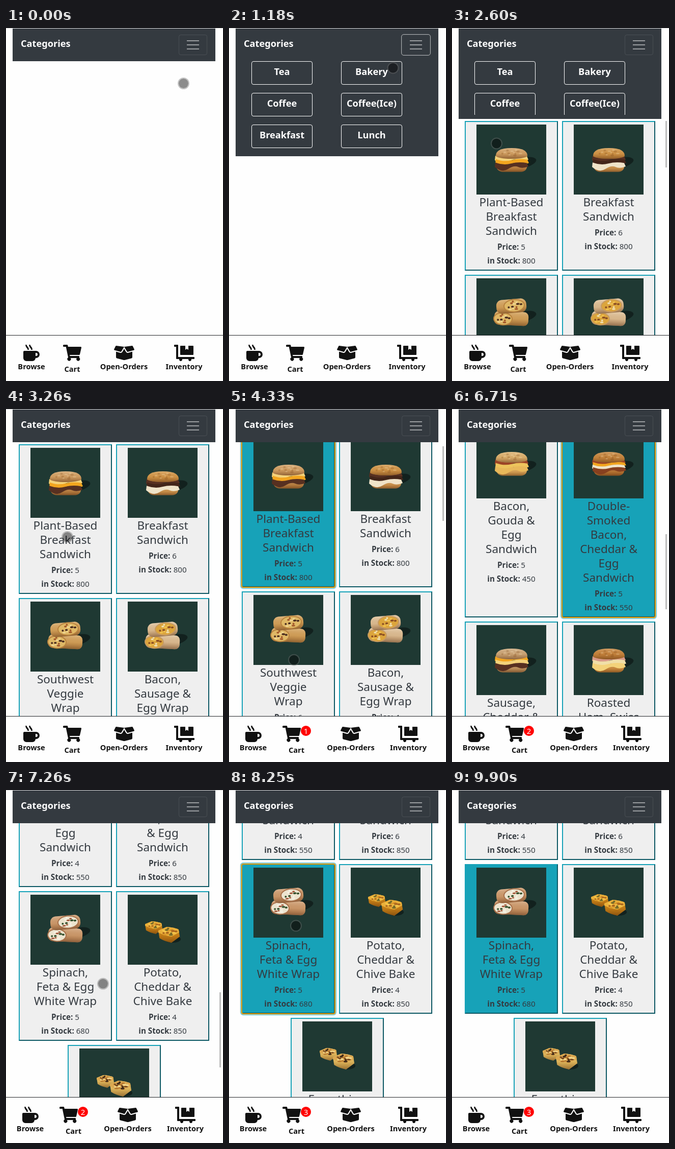
Write an HTML page that moves like this. It is 426x691 px and loops after 10000 ms.

```html
<!DOCTYPE html>
<html lang="en">
<head>
<meta charset="utf-8">
<title>Cafe menu</title>
<style>
  html, body { margin: 0; width: 100%; height: 100%; overflow: hidden; background: #fff; }
  * { box-sizing: border-box; }
  #stage { position: relative; width: 426px; height: 691px; overflow: hidden; background: #fefefe;
    font: 15.2px/24px "Noto Sans", "Open Sans", sans-serif; color: #343a40; }
  #stage::before { content: ""; position: absolute; left: 0; top: 0; width: 100%; height: 1px; background: #dcdcdc; }
  #header { position: absolute; left: 13px; top: 1px; width: 398px; background: #343a40; color: #fff;
    font-size: 18.2px; font-weight: 700; }
  #brand { position: absolute; left: 16px; top: 15px; line-height: 29px; }
  #toggler { position: absolute; left: 326px; top: 12px; width: 56px; height: 40px;
    border: 1px solid rgba(255,255,255,.1); border-radius: 4px; }
  #toggler.focus { outline: 1px solid rgba(255,255,255,.6); }
  #toggler i { position: absolute; left: 15px; width: 24px; height: 2px; background: rgba(255,255,255,.5); }
  #menu { position: absolute; left: 0; top: 56px; width: 398px; overflow: hidden; }
  #menu span { position: absolute; width: 120px; height: 46px; border: 1px solid #fff; border-radius: 4px;
    text-align: center; line-height: 39px; }
  #view { position: absolute; left: 0; width: 426px; overflow: hidden; }
  #list { position: absolute; left: 21px; top: 0; width: 382px; display: flex; flex-wrap: wrap; justify-content: center; }
  .card { width: 183px; margin: 4px; padding: 5px 0 6px; border: 2px outset #17a2b8; background: #efefef; text-align: center; }
  .card svg { display: block; margin: 0 auto 0 21px; background: #1f3933; }
  .card h4 { position: relative; top: 1px; margin: 0 0 6px; font-size: 22.5px; font-weight: 500; line-height: 28px; }
  .card p { margin: 3px 0 0; }
  .card.active { background: #17a2b8; }
  .card.focus { box-shadow: 0 0 0 3.2px rgba(58,176,195,.6); outline: 2px solid #e59700; outline-offset: -1px; border-radius: 3px; }
  #thumb { position: absolute; left: 419px; width: 3px; background: #bcbcbc; }
  #nav { position: absolute; left: 0; top: 601px; width: 426px; height: 90px; border-top: 1px solid #212529;
    background: #fefefe; color: #111; font-size: 14.6px; font-weight: 600; line-height: 20px; }
  #nav svg, #nav span { position: absolute; transform: translateX(-50%); white-space: nowrap; }
  #nav svg { top: 18px; height: 32px; fill: #111; }
  #nav span { top: 50px; }
  #nav span.cart { top: 55px; }
  #badge { position: absolute; left: 141px; top: 18px; width: 20px; height: 20px; border-radius: 50%;
    background: #f00; color: #fff; font-size: 15px; font-weight: 400; text-align: center; }
  #cursor { position: absolute; left: -11.5px; top: -11.5px; width: 23px; height: 23px; border-radius: 50%;
    background: rgba(0,0,0,.45); background-clip: padding-box; border: 2px solid rgba(110,110,110,.4); }
</style>
</head>
<body>
<div id="stage">
  <svg width="0" height="0" style="position:absolute"><defs>
    <linearGradient id="shade" x2="0" y2="1">
      <stop stop-color="#fff" stop-opacity=".2"/><stop offset=".5" stop-color="#7a3c08" stop-opacity=".08"/>
      <stop offset="1" stop-color="#4a2006" stop-opacity=".5"/>
    </linearGradient>
  </defs></svg>
  <div id="view"><div id="list"></div></div>
  <div id="thumb"></div>
  <div id="header">
    <div id="brand">Categories</div>
    <div id="toggler"><i style="top:10px"></i><i style="top:18px"></i><i style="top:26px"></i></div>
    <div id="menu"></div>
  </div>
  <div id="nav"><div id="badge"></div></div>
  <div id="cursor"></div>
</div>
<script>
const $ = id => document.getElementById(id);

// --- food drawings in a 137 x 137 box ---
const shadow = '<ellipse cx="91" cy="75" rx="27" ry="10" transform="rotate(-13 91 75)" fill="#12211e"/>';
const shaded = (shape, color) => `<${shape} fill="${color}"/><${shape} fill="url(#shade)"/>`;

function specks(cx, cy, rx, ry, colors, count = 16) {
  let out = '';
  for (let i = 0; i < count; i++) {
    const r = Math.sqrt((i + .5) / count) * .85, a = i * 2.4;
    out += `<ellipse cx="${(cx + rx * r * Math.cos(a)).toFixed(1)}" cy="${(cy + ry * r * Math.sin(a)).toFixed(1)}"
      rx="${2 + i % 3 * .7}" ry="${1.3 + i % 2 * .5}" fill="${colors[i % colors.length]}"/>`;
  }
  return out;
}

function sandwich(top, layers, bottom) {
  const step = 20 / layers.length;
  const fill = layers.map((color, i) =>
    `<path d="M${37 + i % 2} ${61 + i * step}q16 6 31 2t31-1l3 ${step}q-12 5-20 1t-20 4-26-4z" fill="${color}"/>`).join('');
  return shadow + shaded('path d="M39 77h60q2 15-12 15.500H52Q38 92 39 77z"', bottom) + fill +
    shaded('path d="M38 62q-1-16 31-16t31 16q-8 5-31 5t-31-5z"', top) +
    `<g opacity=".25">${specks(69, 55, 26, 7, ['#fff0cf', '#7b4314'], 12)}</g>`;
}

function wrap(skin, edge, colors) {
  return shadow + `<g transform="rotate(3 68 80)">
    ${shaded('rect x="35" y="65" width="67" height="27" rx="9"', skin)}
    <ellipse cx="52" cy="80" rx="18" ry="12" fill="${colors[0]}" stroke="${edge}" stroke-width="2"/>
    ${specks(52, 80, 16, 10, colors)}</g>
    <g transform="rotate(-5 68 54)">
    ${shaded('rect x="39" y="41" width="59" height="27" rx="11"', skin)}
    <ellipse cx="74" cy="54" rx="20" ry="12" fill="${colors[0]}" stroke="${edge}" stroke-width="2"/>
    ${specks(74, 54, 18, 10, colors)}</g>`;
}

function bites(top, side, colors) {
  const piece = shaded('path d="M0 7L14 0q13 1 20 5l2 14-14 12Q10 28 2 22z"', side) +
    `<path d="M0 7L14 0q13 1 20 5l1 6-13 8Q10 17 0 11z" fill="${top}"/>` + specks(18, 10, 15, 8, colors);
  return `<g transform="translate(34 52) scale(.95 .8)">${piece}</g>
    <ellipse cx="88" cy="87" rx="16" ry="7" fill="#12211e"/>
    <g transform="translate(60 63) scale(1.17 1)">${piece}</g>`;
}

const egg = '#f3d27a', cheese = '#f2a51f', meat = '#573021', white = '#efe3c8', bacon = '#9c4426';
const items = [
  ['Plant-Based|Breakfast|Sandwich', 5, 800, sandwich('#d5a468', [egg, cheese, meat], '#bb8346')],
  ['Breakfast|Sandwich', 6, 800, sandwich('#d59a4c', [meat, '#432519', white], '#cf9852')],
  ['Southwest|Veggie|Wrap', 6, 650, wrap('#d5a45d', '#b9833f', ['#dfb866', '#4a2c20', '#f0d898', '#a3582a'])],
  ['Bacon,|Sausage &|Egg Wrap', 4, 650, wrap('#dfc198', '#c79a62', ['#dca53c', '#8a4d24', '#f2c553', '#f0dfae'])],
  ['Bacon,|Gouda &|Egg|Sandwich', 5, 450, sandwich('#dfb572', [bacon, '#edc45c', '#e8b85a'], '#d9a65a')],
  ['Double-|Smoked|Bacon,|Cheddar &|Egg|Sandwich', 5, 550, sandwich('#c98a42', [bacon, cheese, white, '#87401f'], '#b87635')],
  ['Sausage,|Cheddar &|Egg|Sandwich', 4, 550, sandwich('#cfaa7c', [cheese, egg, meat], '#bd9462')],
  ['Roasted|Ham, Swiss|& Egg|Sandwich', 6, 850, sandwich('#c88740', ['#d99a88', '#f0dfa8', egg], '#cd8f43')],
  ['Spinach,|Feta & Egg|White Wrap', 5, 680, wrap('#cf9d70', '#a8704a', ['#ece4cf', '#34502c', '#9c4a2d', '#f5f0e2'])],
  ['Potato,|Cheddar &|Chive Bake', 4, 850, bites('#eab03a', '#c98318', ['#f6c84d', '#a9641e', '#d9962a', '#756a2a'])],
  ['Everything|Bagel Bake', 5, 700, bites('#dba850', '#e5bf62', ['#6b3d1a', '#f1d58a', '#b0702b', '#432a18'])]
];
$('list').innerHTML = items.map(([name, price, stock, art]) => `<div class="card">
  <svg width="137" height="137" viewBox="0 0 137 137">${art}</svg>
  <h4>${name.replace(/&/g, '&amp;').replace(/\|/g, '<br>')}</h4>
  <p><b>Price:</b> ${price}</p><p><b>in Stock:</b> ${stock}</p></div>`).join('');
const cards = [...document.querySelectorAll('.card')];

$('menu').innerHTML = ['Tea', 'Bakery', 'Coffee', 'Coffee(Ice)', 'Breakfast', 'Lunch'].map((name, i) =>
  `<span style="left:${31 + i % 2 * 176}px;top:${8 + (i >> 1) * 62}px">${name}</span>`).join('');

// --- bottom bar: label, icon width, icon path, then [icon, label] centres with an empty and a filled cart ---
const tabs = [
  ['Browse', 32, 'M25 12H2a2 2 0 0 0-2 2v12a6 6 0 0 0 6 6h12a6 6 0 0 0 6-6h1a7 7 0 0 0 0-14zm0 10h-1v-6h1a3 3 0 0 1 0 6zM4 0h2.6q.3 2.6 2.2 4t2.2 6H8.4q-.2-2.4-2-4T4 0zM11 0h2.6q.3 2.6 2.2 4t2.2 6h-2.6q-.2-2.4-2-4T11 0z', [50, 50], [47.5, 47.5]],
  ['Cart', 36, 'M0 1.5A1.5 1.5 0 0 1 1.5 0h6.3q1.2 0 1.5 1.2L9.9 4h24.6q1.8.2 1.5 1.8l-3 13q-.3 1.2-1.5 1.2H13l.5 2h17.2q1.6.3 1.4 1.8l-.3 1.5a3.5 3.5 0 1 1-4.9.7H14.7a3.5 3.5 0 1 1-4.6-.9L5.7 4H1.5Q0 4 0 2.5z', [130, 130], [123, 132.5]],
  ['Open-Orders', 40, 'M4 13.5v11q0 1.6 1.5 2L19 29.9h2l13.5-3.4q1.5-.4 1.5-2v-11l-8.6 2.4q-2.4.4-3.5-1.3l-3.9-6.7-3.9 6.7q-1.2 1.7-3.5 1.3zM36.7 2.6q-.4-.7-1.2-.6L20 4l5.7 9.5q.5.6 1.2.4l12.4-3.5q.9-.5.6-1.4zM3.3 2.6q.4-.7 1.2-.6L20 4l-5.7 9.5q-.5.6-1.2.4L.7 10.4q-.9-.5-.6-1.4z', [231.5, 231.5], [239, 239]],
  ['Inventory', 40, 'M13 20h24q1 0 1-1V3q0-1-1-1h-9v8l-3-2-3 2V2h-9q-1 0-1 1v16q0 1 1 1zM39 24H8V1q0-1-1-1H1Q0 0 0 1v2q0 1 1 1h3v23q0 1 1 1h5.2a3 3 0 1 0 5.6 0h12.4a3 3 0 1 0 5.6 0H39q1 0 1-1v-2q0-1-1-1z', [349.5, 349.5], [352, 352]]
];
$('nav').insertAdjacentHTML('afterbegin', tabs.map(([label, w, path]) =>
  `<svg width="${w}" viewBox="0 0 ${w} 32"><path d="${path}"/></svg><span class="${label.toLowerCase()}">${label}</span>`).join(''));
const icons = document.querySelectorAll('#nav svg'), labels = document.querySelectorAll('#nav span');

// --- timing ---
const LOOP = 10000, CONTENT = 1945;
// The picture advances in bursts: [start, end, steps].
const bursts = [[120, 360, 3], [670, 1600, 8], [1750, 2290, 5], [2600, 3260, 6], [3670, 4600, 8],
  [4750, 5720, 8], [5990, 6980, 8], [7110, 8100, 8], [8250, 9060, 7], [9900, 9900, 1]];
const scrollKeys = [[4201, 0], [4334, 13], [4467, 160], [4600, 330], [4750, 395], [4889, 438], [5030, 520],
  [5300, 610], [5720, 628], [6556, 628], [6697, 640], [6838, 720], [6980, 860], [7110, 1060],
  [7251, 1187], [7393, 1228], [7535, 1240]];
const cursorKeys = [[0, 348, 108], [360, 360, 40], [936, 360, 40], [1600, 167, 229], [2020, 120, 220],
  [2290, 87, 225.5], [2600, 87, 225.5], [3260, 120, 250], [3803, 120, 250], [4334, 127, 491],
  [4600, 142, 190], [4889, 147, 99], [5300, 147, 90], [5720, 290, 230], [6414, 290, 230],
  [6697, 240, 560], [6980, 205, 480], [7251, 190, 379], [7393, 180, 300], [7817, 101, 211],
  [8150, 101, 211], [9060, 374, 705]];
const clicks = [[3670, 0], [6131, 5], [7817, 8]];
const scrollbarTimes = [[2600, 3200], [4300, 5650], [6650, 7900]];

function snap(t) {
  t += 20;
  const burst = bursts.filter(b => b[0] <= t).pop();
  if (!burst) return 0;
  const [start, end, steps] = burst;
  if (steps === 1) return start;
  const gap = (end - start) / (steps - 1);
  return start + gap * Math.min(steps - 1, Math.floor((t - start) / gap));
}

function at(keys, t) {
  const next = keys.findIndex(k => k[0] > t);
  if (next < 0) return keys[keys.length - 1].slice(1);
  if (next === 0) return keys[0].slice(1);
  const a = keys[next - 1], b = keys[next], p = (t - a[0]) / (b[0] - a[0]);
  return a.slice(1).map((v, i) => v + (b[i + 1] - v) * p);
}

function ease(t, start, length) {
  const p = Math.min(1, Math.max(0, (t - start) / length));
  return p * p * (3 - 2 * p);
}

function draw(time) {
  const t = snap(time);
  const open = ease(t, 600, 350) - ease(t, 2450, 350);
  const bottom = Math.round(65 + 186 * open);
  $('header').style.height = bottom - 1 + 'px';
  $('menu').style.height = Math.max(0, bottom - 65) + 'px';
  $('toggler').classList.toggle('focus', t >= 670 && t < 2600);

  const scroll = Math.round(at(scrollKeys, t)[0]), height = 601 - bottom;
  $('view').style.top = bottom + 'px';
  $('view').style.height = height + 'px';
  $('list').style.transform = `translateY(${-scroll}px)`;
  $('list').style.visibility = t >= 2600 ? 'visible' : 'hidden';
  $('thumb').style.top = bottom + 4 + scroll * height / CONTENT + 'px';
  $('thumb').style.height = height * height / CONTENT - 1 + 'px';
  $('thumb').hidden = !scrollbarTimes.some(([a, b]) => t >= a && t < b);

  const done = clicks.filter(c => c[0] <= t + 1), count = done.length;
  const active = count ? done[count - 1][1] : -1;
  cards.forEach((card, i) => {
    card.classList.toggle('active', i === active);
    card.classList.toggle('focus', i === active && t < 9900);
  });
  $('badge').hidden = !count;
  $('badge').textContent = count;
  tabs.forEach((tab, i) => {
    const [iconX, labelX] = tab[count ? 4 : 3];
    icons[i].style.left = iconX + 'px';
    labels[i].style.left = labelX + 'px';
  });

  const [x, y] = at(cursorKeys, t);
  $('cursor').style.transform = `translate(${x}px, ${y}px)`;
  $('cursor').hidden = t > 6650 && t < 6750;
}

const begin = performance.now();
function tick() {
  draw((performance.now() - begin) % LOOP);
  requestAnimationFrame(tick);
}
tick();
</script>
</body>
</html>
```
